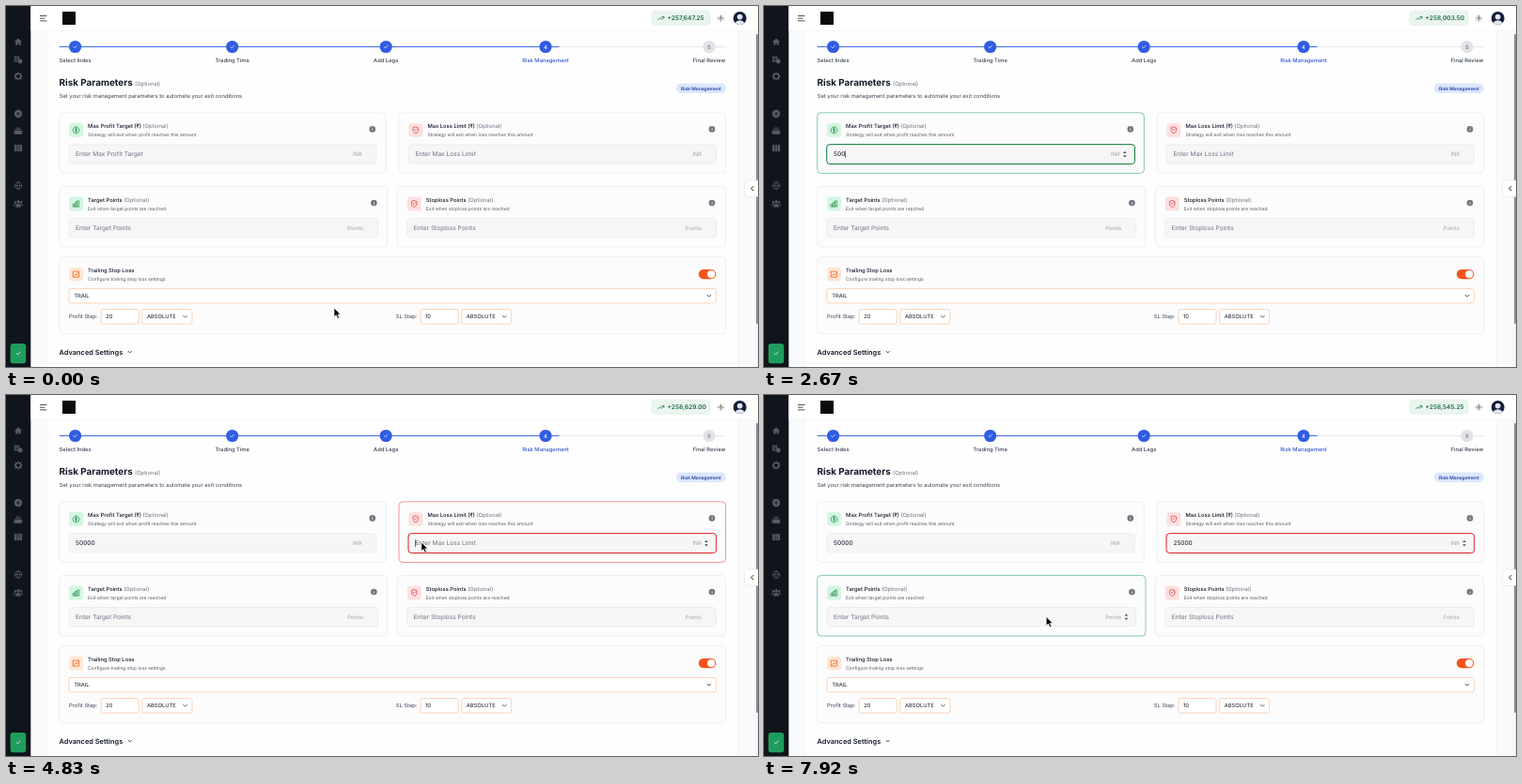
Recreate the animation shown at these times as an HTML page. Size 800 by 385 pixels, loop 8 s.

```html
<!DOCTYPE html>
<html lang="en">
<head>
<meta charset="utf-8">
<title>Risk parameters</title>
<style>
  html, body { margin: 0; width: 100%; height: 100%; overflow: hidden; background: #fff; }
  svg { display: block; width: 800px; height: 385px; }
  text { font-family: Inter, "Open Sans", sans-serif; text-rendering: geometricPrecision; white-space: pre; }
</style>
</head>
<body>
<svg id="stage" viewBox="0 0 800 385"></svg>
<script>
const stage = document.getElementById('stage');
const XS = 4.96, SM = 5.82, BASE = 6.58, LG = 7.4, XL = 9.87;
const INK = '#111827', GREY = '#6b7280', PALE = '#9ca3af', LINE = '#e3e5ea';
const BLUE = '#2f5ce2', GREEN = '#15803d', RED = '#dc2626', ORANGE = '#f4541d';

function add(tag, attrs, parent = stage) {
  const node = document.createElementNS('http://www.w3.org/2000/svg', tag);
  for (const key in attrs) node.setAttribute(key, attrs[key]);
  return parent.appendChild(node);
}
function box(x, y, x2, y2, rx, fill, stroke = 'none', width = 0.6) {
  return add('rect', { x, y, width: x2 - x, height: y2 - y, rx, fill, stroke, 'stroke-width': width });
}
function dot(cx, cy, r, fill) {
  return add('circle', { cx, cy, r, fill });
}
function label(str, x, y, size = SM, fill = INK, weight = 400, anchor = 'start') {
  const node = add('text', { x, y, fill, 'font-size': size, 'font-weight': weight, 'text-anchor': anchor });
  node.textContent = str;
  return node;
}
// Line icons live on a 24-unit grid centred at (x, y).
function icon(d, x, y, size, stroke, width = 2, fill = 'none') {
  const k = size / 24;
  return add('path', {
    d, fill, stroke, 'stroke-width': width, 'stroke-linecap': 'round', 'stroke-linejoin': 'round',
    transform: `translate(${x - size / 2} ${y - size / 2}) scale(${k})`
  });
}
function titled(str, x, y, size = SM, weight = 500) {
  const node = label(str + ' ', x, y, size, INK, weight);
  const tail = add('tspan', { fill: GREY, 'font-weight': 400, 'font-size': SM }, node);
  tail.textContent = '(Optional)';
}

const CHECK = 'M5 12l5 5L19 7';
const DOWN = 'M5 8l7 7 7-7';
const SHIELD = 'M12 2l8 3v7c0 5-4 8-8 10-4-2-8-5-8-10V5zM9 11l2 2 4-4';
const COIN = 'M12 2a10 10 0 1 0 .1 0M15 8.5c-1-1-6-1.5-6 1s6 2 6 4.5-5 2-6 1M12 6v12';
const BARS = 'M3 13h5v8H3zM9.5 8h5v13h-5zM16 3h5v18h-5z';
const CHART = 'M3 3h18v18H3zM7 16l4-5 3 3 4-6';

function drawSidebar() {
  box(0, 0, 26.3, 385, 0, '#10141b');
  const c = '#565c67';
  icon('M2 12L12 3l10 9h-3v9h-5v-6h-4v6H5v-9z', 13, 38, 9, c, 1, c);
  icon('M4 4h11v13H4zM8 8h3M8 12h3', 12.5, 57, 9, c, 3);
  dot(15.2, 59, 2.4, c);
  icon('M12 4a8 8 0 1 0 .1 0M12 1v4M12 19v4M1 12h4M19 12h4M4 4l3 3M17 17l3 3M20 4l-3 3M7 17l-3 3', 13, 75, 8.5, c, 4);
  dot(13, 115, 4.2, c);
  icon('M12 7v10M7 12h10', 13, 115, 9, '#10141b', 2);
  icon('M7 4h10M5 8h14M2 12h20v9H2z', 13, 133, 9, c, 2, c);
  icon('M2 3h5v18H2zM10 3h4v18h-4zM17 3h5v18h-5z', 13, 151.5, 9, c, 1, c);
  icon('M12 2a10 10 0 1 0 .1 0M2 12h20M12 2c-6 5-6 15 0 20M12 2c6 5 6 15 0 20', 13, 191.5, 9, c, 2);
  icon('M12 5a3 3 0 1 0 .1 0M4.5 7a2 2 0 1 0 .1 0M19.5 7a2 2 0 1 0 .1 0M6 20c0-9 12-9 12 0zM1 18c0-4 2-5 4-5M23 18c0-4-2-5-4-5', 13, 210.5, 10, c, 2, c);
  box(4.6, 360, 21.2, 381.2, 3, '#1f9d5c');
  icon(CHECK, 13, 370.5, 7, '#fff', 2.5);
}

function drawHeader() {
  box(26.3, 0, 800, 26.3, 0, '#fff');
  box(26.3, 25.9, 798, 26.3, 0, '#e6e8ec');
  icon('M2 4h20M2 12h14M2 20h20', 39.7, 13.2, 8, '#222', 2.4);
  box(60, 6, 74, 20, 0, '#0b0b0d');
  box(686.8, 5, 749.2, 20.6, 4, '#ebf5ef', '#dcece3', 0.5);
  icon('M2 18l7-7 5 5 8-9M16 7h6v6', 696.7, 13, 7.5, '#16754a', 2.4);
  icon('M12 8a4 4 0 1 0 .1 0M12 2v1M12 21v1M2 12h1M21 12h1M5 5l.5.5M18.5 18.5l.5.5M19 5l-.5.5M5.5 18.5l-.5.5', 760.5, 13.1, 7.2, '#222', 2.4);
  dot(780.7, 13, 7, '#131c38');
  dot(780.7, 11.6, 2.9, '#e3e6ee');
  add('path', { d: 'M775.7 17.9q1.5-2.7 5-2.7t5 2.7a7 7 0 0 1-10 0z', fill: '#e3e6ee' });
}

function drawSteps() {
  box(56.7, 43.05, 765.7, 43.95, 0, '#e3e5ea');
  box(56.7, 43.05, 588.4, 43.95, 0, BLUE);
  const steps = [['Select Index', 73.6], ['Trading Time', 240.7], ['Add Legs', 404.2], ['Risk Management', 574], ['Final Review', 748]];
  steps.forEach(([name, x], i) => {
    dot(x, 43.5, 6.6, i < 4 ? BLUE : '#e1e3e7');
    if (i < 3) icon(CHECK, x, 43.5, 6.5, '#fff', 2.5);
    else label(i + 1, x, 45.6, SM, i < 4 ? '#fff' : GREY, 500, 'middle');
    label(name, x, 59.6, SM, i === 3 ? '#3155cf' : '#374151', 500, 'middle');
  });
}

function drawCard(o) {
  const { x, x2, y } = o;
  const card = box(x, y, x2, y + 64.6, 4, '#fcfcfd', LINE);
  const left = x + 10.4, right = x2 - 10.3;
  const tone = o.green ? GREEN : RED;
  box(left, y + 11.2, left + 15, y + 26, 3.2, o.green ? '#d3f5e1' : '#fde0e0');
  icon(o.art, left + 7.5, y + 18.6, 8.2, tone, 2);
  titled(o.title, left + 20, y + 16.5);
  label(o.note, left + 20, y + 25.4, XS, '#565d69');
  dot(right - 4.3, y + 17.6, 3.3, '#70757f');
  label('i', right - 4.3, y + 19.3, 4.6, '#fff', 700, 'middle');
  box(left, y + 34.2, right, y + 54.3, 3, '#f6f6f7', LINE);
  const ring = box(left - 0.4, y + 33.8, right + 0.4, y + 54.7, 3.4, 'none', tone, 1);
  const mid = y + 44.3;
  const hint = label(o.hint, left + 7, mid + 2.3, BASE, GREY);
  const value = label('', left + 7, mid + 2.3, BASE, INK);
  label(o.unit, o.unitX, mid + 2.1, SM, PALE);
  const spinner = icon('M7 9l5-6 5 6zM7 15l5 6 5-6z', right - 10.3, mid, 9, 'none', 0, '#555');
  const caret = box(0, mid - 3.8, 0.6, mid + 3.8, 0, '#111');
  return { card, ring, hint, value, spinner, caret, left, glow: o.green ? [52, 168, 120] : [239, 78, 78] };
}

function drawTrailing() {
  box(56.7, 267.5, 765.6, 349.6, 4, '#fcfcfd', LINE);
  box(67.1, 278.7, 82, 293.5, 3.2, '#fee6d5');
  icon(CHART, 74.6, 286.1, 8, '#ea580c', 2.2);
  label('Trailing Stop Loss', 87, 284.1, SM, INK, 500);
  label('Configure trailing stop loss settings', 87, 292.8, XS, '#565d69');
  box(736.8, 281, 755.3, 291.2, 5.1, ORANGE);
  dot(750.2, 286.1, 4.1, '#fff');
  const amber = '#fbb883';
  box(67, 301.4, 755.3, 316.9, 2, '#fff', amber);
  label('TRAIL', 72.2, 311.2);
  icon(DOWN, 748, 309.2, 6.5, '#222', 2.6);
  [['Profit Step:', 67, 101.2, '20'], ['SL Step:', 414.7, 441, '10']].forEach(([name, x, fx, amount]) => {
    label(name, x, 333.4, SM, '#374151');
    box(fx, 323.6, fx + 40, 339.1, 2, '#fff', amber);
    label(amount, fx + 5, 333.4);
    box(fx + 43.7, 323.6, fx + 96.7, 339.1, 2, '#fff', amber);
    label('ABSOLUTE', fx + 48.8, 333.4);
    icon(DOWN, fx + 89.3, 331.4, 6.5, '#222', 2.6);
  });
}

box(0, 0, 800, 385, 0, '#f9fafb');
box(43, 20, 779, 395, 0, '#fefefe', '#e8eaee');
drawSidebar();
drawHeader();
drawSteps();
titled('Risk Parameters', 56.6, 85.2, XL, 700);
label('Set your risk management parameters to automate your exit conditions', 56.7, 98.2, SM, '#374151');
box(713, 82.6, 765.8, 93, 5.2, '#dbe7fd');
label('Risk Management', 739.4, 89.5, XS, '#2340a0', 600, 'middle');

const cards = [
  { x: 56.7, x2: 404.4, y: 113.8, green: true, art: COIN, title: 'Max Profit Target (₹)', note: 'Strategy will exit when profit reaches this amount', hint: 'Enter Max Profit Target', unit: 'INR', unitX: 369 },
  { x: 418, x2: 765.6, y: 113.8, art: SHIELD, title: 'Max Loss Limit (₹)', note: 'Strategy will exit when loss reaches this amount', hint: 'Enter Max Loss Limit', unit: 'INR', unitX: 730.4 },
  { x: 56.7, x2: 406, y: 192.4, green: true, art: BARS, title: 'Target Points', note: 'Exit when target points are reached', hint: 'Enter Target Points', unit: 'Points', unitX: 363.2 },
  { x: 416.4, x2: 765.6, y: 192.4, art: SHIELD, title: 'Stoploss Points', note: 'Exit when stoploss points are reached', hint: 'Enter Stoploss Points', unit: 'Points', unitX: 722.8 }
].map(drawCard);
drawTrailing();
label('Advanced Settings', 56.6, 371.7, LG, INK, 600);
icon(DOWN, 131.7, 369.2, 5.8, '#222', 3.4);

box(797.8, 26.3, 800, 385, 0, '#f4f4f5');
box(798, 30, 800, 339, 1, '#8d8f93');
box(785.6, 186, 806, 203.3, 4, '#fff', '#dfe1e6');
icon('M15 5l-7 7 7 7', 794, 194.6, 7.5, '#111', 3);

const total = label('', 703.6, 15.4, BASE, '#176b45', 600);
const pointer = add('path', {
  d: 'M0 0V9.6L2.3 7.6 3.9 11.2 5.6 10.4 4 6.9H7z',
  fill: '#000', stroke: '#fff', 'stroke-width': 0.7, 'stroke-linejoin': 'round'
});

const LOOP = 8000, TICK = LOOP / 96, FADE = 260;
const path = [[250, 349, 322], [830, 234.7, 158], [3450, 234.7, 158], [4170, 426.7, 153], [4500, 441.8, 157], [7250, 441.8, 157], [7900, 300.2, 236.5]];
const hidden = [[2000, 3450], [5950, 7250]];
const hovers = [[700, 4010], [4060, 7480], [7580, 9000], [9000, 9000]];
const focuses = [[1250, 4500], [4500, 9000], [9000, 9000], [9000, 9000]];
const typed = [
  { text: '50000', keys: [2000, 2300, 2600, 2950, 3250] },
  { text: '25000', keys: [6000, 6250, 6500, 6750, 7000] }
];
const totals = [
  [0, 257647.25], [450, 257698.5], [900, 257750.5], [1400, 257822.75], [1900, 257905],
  [2450, 258003.5], [3000, 258118.25], [3500, 258214.5], [4050, 258336.25], [4400, 258487.75],
  [4750, 258629], [5300, 258604.5], [5800, 258577.25], [6300, 258554.25], [6850, 258549.75], [7400, 258545.25]
];

const clamp = v => Math.max(0, Math.min(1, v));
const within = (t, [a, b]) => t >= a && t < b;
const show = (node, on) => node.setAttribute('visibility', on ? 'visible' : 'hidden');

function pointerAt(t) {
  let from = path[0];
  for (const to of path) {
    if (t < to[0]) {
      const p = clamp((t - from[0]) / (to[0] - from[0] || 1));
      const e = p * p * (3 - 2 * p);
      return [1, 2].map(i => from[i] + (to[i] - from[i]) * e);
    }
    from = to;
  }
  return from.slice(1);
}

function renderCard(c, i, t) {
  const hover = within(t, hovers[i]), focus = within(t, focuses[i]);
  const glow = clamp((t - hovers[i][0]) / FADE) * (1 - clamp((t - hovers[i][1]) / FADE));
  const rgb = c.glow.map((v, k) => Math.round([227, 229, 234][k] * (1 - glow) + v * glow));
  c.card.setAttribute('stroke', `rgb(${rgb})`);
  show(c.ring, focus);
  show(c.spinner, hover || focus);
  const { text, keys } = typed[i] || { text: '', keys: [] };
  const done = keys.filter(k => t >= k);
  c.value.textContent = text.slice(0, done.length);
  show(c.hint, !done.length);
  const since = t - (done.length ? done[done.length - 1] : focuses[i][0]);
  show(c.caret, focus && Math.floor(since / 500) % 2 === 0);
  if (focus) c.caret.setAttribute('x', c.left + 7 + (done.length ? c.value.getComputedTextLength() : 0));
}

function render(time) {
  const t = Math.floor((time % LOOP + 4) / TICK) * TICK;
  cards.forEach((c, i) => renderCard(c, i, t));
  const amount = totals.filter(row => t >= row[0]).pop()[1];
  total.textContent = '+' + amount.toLocaleString('en-US', { minimumFractionDigits: 2 });
  pointer.setAttribute('transform', `translate(${pointerAt(t)})`);
  show(pointer, !hidden.some(span => within(t, span)));
}

const start = performance.now();
function frame() {
  render(performance.now() - start);
  requestAnimationFrame(frame);
}
frame();
</script>
</body>
</html>
```
